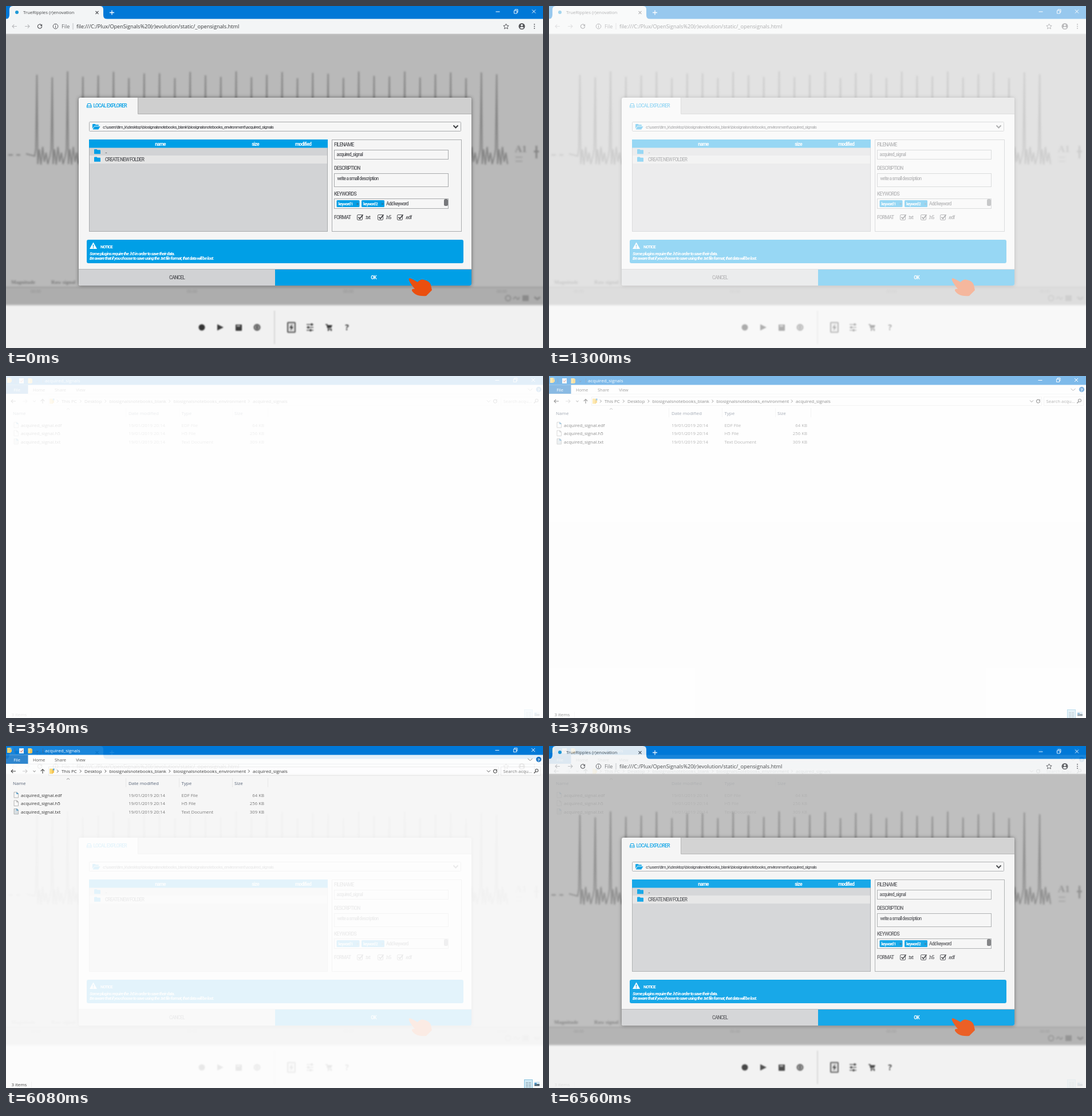
An HTML page that plays this animation: 938 by 597 pixels, repeating every 6620 ms.

```html
<!DOCTYPE html>
<html lang="en">
<head>
<meta charset="utf-8">
<title>Saving an acquired signal</title>
<style>
  html, body { margin: 0; width: 100%; height: 100%; overflow: hidden; background: #fefefe; }
  svg { display: block; width: 938px; height: 597px; }
  text { white-space: pre; }
  .ui { font-family: "Open Sans", "Noto Sans", sans-serif; }
  .app { font-family: Roboto, "Liberation Sans", sans-serif; font-weight: 500; letter-spacing: -.05em; }
  .soft { filter: blur(1.5px); }
  .panel { filter: drop-shadow(0 0 3px #0007); }
</style>
</head>
<body>
<svg viewBox="0 0 938 597">
  <g id="explorer"></g>
  <g id="dialog"></g>
</svg>
<script>
const BLUE = '#009fe6', WIN = '#0078d7', GREY = '#a9abad', INK = '#55565a';
const rect = (x, y, w, h, fill, more = '') =>
  `<rect x="${x}" y="${y}" width="${w}" height="${h}" fill="${fill}" ${more}/>`;
const box = (x, y, w, h, fill, stroke, more = '') =>
  rect(x + .5, y + .5, w - 1, h - 1, fill, `stroke="${stroke}" ${more}`);
const text = (x, y, size, fill, str, more = '') =>
  `<text x="${x}" y="${y}" font-size="${size}" fill="${fill}" ${more}>${str}</text>`;
const line = (d, stroke, w = 1, more = '') =>
  `<path d="${d}" fill="none" stroke="${stroke}" stroke-width="${w}" ${more}/>`;
const shape = (d, fill) => `<path d="${d}" fill="${fill}"/>`;
const circle = (x, y, r, fill, more = '') => `<circle cx="${x}" cy="${y}" r="${r}" fill="${fill}" ${more}/>`;
const at = (x, y, body) => `<g transform="translate(${x} ${y})">${body}</g>`;
const group = (cls, ...parts) => `<g class="${cls}">${parts.join('')}</g>`;

const MID = 'text-anchor="middle"', END = 'text-anchor="end"', BOLD = 'font-weight="700"';

const windowButtons = (x, y) => at(x, y,
  line('M-3.5 .5H3.5', '#fff') +
  line('M28.5-1.5h5v5h-5zM30-1.5v-2h5v5h-1.5', '#fff', .9) +
  line('M60-3l6 6m0-6l-6 6', '#fff'));
const arrow = (x, y, color, dir) =>
  line(`M${x - 4 * dir} ${y}h${8 * dir}m${-3.2 * dir}-3.2l${3.2 * dir} 3.2l${-3.2 * dir} 3.2`, color, 1.1);
const reload = (x, y, r, color) =>
  line(`M${x + r} ${y}a${r} ${r} 0 1 1-${r * .3}-${r * .7}`, color, 1.2) +
  shape(`M${x + r + .5} ${y - r - .5}v${r}h-${r}z`, color);

/* Browser window */
function browser() {
  const dots = [-3.5, 0, 3.5].map(d => circle(923, 35.5 + d, .9, INK)).join('');
  return group('ui',
    rect(0, 0, 938, 23, WIN),
    shape('M0 23Q6 22 6 15V6Q6 0 12 0H164Q170 0 170 6V16Q170 23 177 23Z', '#f3f5f6'),
    rect(0, 22.5, 938, 26, '#f3f5f6'),
    circle(19, 11, 3, '#1f9ad6'),
    text(30, 14, 7.87, '#454749', 'TrueRipples (r)enovation'),
    line('M156.500 9l5 5m0-5l-5 5', INK, 1.1),
    line('M181 11.500h8m-4-4v8', '#fff', 1.3),
    windowButtons(859, 9.500),
    arrow(15, 35.500, '#b8babc', -1), arrow(37, 35.500, '#b8babc', 1),
    reload(59, 35.500, 3.6, INK),
    circle(86.500, 35.500, 4.3, 'none', `stroke="${INK}"`),
    line('M86.500 35v3m0-5.200v1.200', INK, 1.1),
    text(97, 39, 9, '#66686b', 'File'), rect(116.500, 30, 1, 11, '#c0c2c4'),
    text(123, 38.700, 9.14, '#36383a',
      'file:///C:/Plux/OpenSignals%20(r)evolution/static/_opensignals.html'),
    line('M873.500 31l1.400 3 3.300.400-2.500 2.200.700 3.300-2.900-1.700-2.900 1.700.700-3.300-2.500-2.200 3.300-.400z', INK),
    circle(901, 35.500, 5.5, INK), circle(901, 33.500, 1.8, '#f3f5f6'),
    shape('M897.500 38Q901 34.700 904.500 38Q901 41 897.500 38', '#f3f5f6'), dots);
}

/* Blurred recording page behind the dialog */
function recording() {
  let wave = 'M35 258';
  for (let i = 0; i < 31; i++) {
    const x = 54 + i * 26.77, top = 120 + 6 * Math.sin(i * 2.3);
    const pts = [[-4, 262], [-2, 250], [0, top], [1.5, 276], [4, 250], [7, 277], [10, 246], [13, 272], [16, 256], [19, 276]];
    wave += pts.map(([dx, y]) => `L${x + dx} ${y}`).join('');
  }
  const c = '#3c3c3c';
  return rect(0, 48, 938, 476, '#b9b9b9') + group('soft',
    rect(-5, 47, 948, 2, '#d0d0d0'),
    rect(-5, 491, 948, 31, '#adadad'), rect(-5, 490, 948, 1.5, '#999'),
    rect(-5, 522, 948, 80, '#f1f1f1'), rect(-5, 521, 948, 2, '#c8c8c8'),
    line(wave, '#858585', 2.2),
    line('M4 260h8m6 0h7', '#8a8a8a', 2.5),
    text(889, 255, 17, '#888', 'A1', BOLD),
    line('M890 264h12m-12 7h12', '#a0a0a0', 2),
    line('M922 254h9m-4.500-10v22', '#858585', 3),
    text(9, 485, 9, '#777', 'Magnitude', BOLD), text(79, 485, 9, '#777', 'Raw signal', BOLD),
    [52, 325, 598, 866].map(x => text(x, 501, 8, '#929292', '00:00', MID)).join(''),
    circle(877, 510, 4.5, 'none', 'stroke="#8c8c8c" stroke-width="2"'),
    line('M886 512q4-7 6-2t5-2', '#8c8c8c', 2),
    rect(902, 505, 11, 10, '#8a8a8a'), line('M923 508l5 4 5-4', '#888', 3)) +
  `<g style="filter:blur(1px)">` +
    circle(342, 561, 5.5, '#333') + shape('M369 555.500l11 5.500-11 5.500z', '#3c3c3c') +
    rect(401, 556, 11, 11, c, 'rx="1"') + rect(403, 557, 6, 3, '#999') +
    circle(438.500, 561, 5, '#999', 'stroke="#555" stroke-width="2"') + rect(437.500, 558, 2, 6, '#444') +
    rect(468, 532, 2, 58, '#d8d8d8') +
    rect(492, 552.500, 13, 17, '#ddd', 'stroke="#555" stroke-width="2" rx="1"') +
    shape('M500 555l-5 7h3l-1 5 5-7h-3z', c) +
    line('M525 556h12m-12 5h12m-12 5h12', '#555', 1.5) +
    line('M534 554v4m-6 1v4m4 1v4', c, 2.5) +
    line('M558 556h3l2 8h6', c, 1.5) + shape('M560 557h10l-2 5h-7z', c) +
    circle(563, 566, 1.3, c) + circle(568, 566, 1.3, c) +
    text(595.500, 566, 14, c, '?', `${MID} ${BOLD} class="ui"`) + '</g>';
}

const folder = (x, y) => shape(`M${x} ${y}q0-1 1-1h3.500l1.200 1.300h4.300q1 0 1 1v6h-11z`, BLUE);
const check = (x, label) =>
  box(x, 364, 10, 10, '#f4f4f4', INK, 'rx="1.5"') +
  line(`M${x + 2.5} 368.500l2.500 2.700 5.500-7`, '#3d3e42', 1.7) +
  text(x + 14, 372, 8.5, INK, label);
const keyword = (x, label) =>
  rect(x, 339, 40, 12, BLUE, 'rx="1.5"') +
  text(x + 3, 347.500, 7, '#fff', label, BOLD) +
  line(`M${x + 35} 344l3 3m0-3l-3 3`, '#40617a', 1);

function saveDialog() {
  const label = (y, str) => text(573, y, 8.6, INK, str);
  const head = (x, str) => text(x, 243.500, 8.7, '#fff', str, `${MID} ${BOLD}`);
  return group('app',
    rect(127, 160, 686, 328, '#f5f5f5', 'rx="3" class="panel"'),
    shape('M231 160H810q3 0 3 3V188H231z', '#cfcfcf'),
    line('M230.500 160V188.500H813', '#b0b0b0'),
    line('M141.500 174.500l1.500-4h4.500l1.500 4v2.500h-7.500zM141.500 174.500h7.500', BLUE, 1.1),
    text(152.500, 177, 8.5, BLUE, 'LOCAL EXPLORER'),

    box(145, 202, 650, 17, '#f6f6f6', GREY, 'rx="1"'),
    shape('M151 214v-7q0-1 1-1h3.500l1.200 1.300h4.300q1 0 1 1v1h-7.500z', BLUE),
    shape('M151.500 215.500l3-5.200h10l-3.200 5.200z', BLUE),
    text(169, 213.500, 8, INK,
      'c:\\users\\tim_k\\desktop\\biosignalsnotebooks_blank\\biosignalsnotebooks_environment\\acquired_signals'),
    line('M781.500 208.500l4 4 4-4', '#3d3e42', 2),

    box(145, 233, 417, 161, '#d2d3d5', GREY),
    rect(145, 233, 417, 14.500, BLUE),
    rect(146, 261, 415, 14, '#e5e5e5'),
    head(269.500, 'name'), head(435.500, 'size'), head(519, 'modified'),
    folder(154, 251), folder(154, 264.500),
    text(173, 257, 8.25, INK, '..'), text(173, 271, 8.25, INK, 'CREATE NEW FOLDER'),

    box(569, 233, 227, 161, 'none', GREY),
    label(245, 'FILENAME'), label(286, 'DESCRIPTION'), label(331, 'KEYWORDS'), label(372, 'FORMAT'),
    box(573, 251, 200, 17, '#f6f6f6', GREY), text(577.500, 262, 8.2, INK, 'acquired_signal'),
    box(573, 292, 200, 24, '#f6f6f6', GREY), text(578.500, 303.500, 8.4, INK, 'write a small description'),
    box(573, 336, 200, 18, '#f6f6f6', GREY),
    keyword(577.500, 'keyword 1'), keyword(621, 'keyword 2'),
    text(664, 348, 8.2, INK, 'Add keyword'),
    rect(765, 337, 7, 12, '#77787b', 'rx="2.5"'),
    check(613, '.txt'), check(649, '.h5'), check(683, '.edf'),

    rect(141, 408, 658, 41, BLUE, 'rx="3"'),
    shape('M152.500 412.500l6.500 11.500h-13z', '#fff'),
    line('M152.500 416.500v3.700m0 1v1.500', BLUE, 1.5),
    text(165, 422.500, 7.4, '#fff', 'NOTICE', BOLD),
    text(146, 434.500, 8, '#fff', 'Some plugins require the .h5 in order to save their data.', `${BOLD} font-style="italic"`),
    text(146, 443, 8, '#fff', 'Be aware that if you choose to save using the .txt file format, that data will be lost.',
      `${BOLD} font-style="italic"`),

    shape('M127 460H470V488H130q-3 0-3-3z', '#d1d2d4'),
    shape('M470 460H813V485q0 3-3 3H470z', BLUE),
    line('M127 459.500H813', '#b4b5b7'),
    text(298.500, 476.700, 8.4, INK, 'CANCEL', MID),
    text(642, 476.700, 8.4, '#fff', 'OK', `${MID} ${BOLD}`),
    shape('M705 475Q711 477 719 482Q724 476 730 478Q740 480 742 487L744 496L734 506Q722 507 715 503Q708 498 709 495Q711 493 714 494Q706 484 704 479Q703 476 705 475Z', '#ea4f0f'));
}

/* File manager window */
const page = (x, y, fold = '#9a9a9a', fill = '#fff') =>
  shape(`M${x} ${y}h5l2.500 2.500v7h-7.500z`, fill) +
  line(`M${x} ${y}h5l2.500 2.500v7h-7.500z`, '#a5a5a5', .8) + line(`M${x + 5} ${y}v2.500h2.500`, fold, 1.4);
const openFolder = (x, y) =>
  rect(x, y, 6, 9, '#ffd868') + shape(`M${x + 4} ${y + 2}l4-2v7l-4 2z`, '#f3bf45') +
  rect(x + 6, y, 2.500, 3, '#3f9be0');

function explorer() {
  const chevron = x => line(`M${x} 41.500l2.500 2.500-2.500 2.500`, '#444');
  const crumbs = [[97, 'This PC'], [137, 'Desktop'], [180.500, 'biosignalsnotebooks_blank'],
    [292.500, 'biosignalsnotebooks_environment'], [431, 'acquired_signals']];
  const files = [['edf', 'EDF File', '64 KB'], ['h5', 'H5 File', '256 KB'], ['txt', 'Text Document', '309 KB']];
  const columns = [[12, 'Name'], [214, 'Date modified'], [306.500, 'Type'], [399, 'Size']];
  return group('ui',
    rect(0, 0, 938, 597, '#fefefe'),
    rect(0, 0, 938, 15.500, WIN),
    openFolder(2, 3), rect(15, 4, 1, 8, '#2a5f94'),
    rect(23, 4, 8, 9, '#f5f5f5'), line('M25 8.500l1.700 2 3-4', '#d04a3c', 1),
    rect(38.500, 4, 6, 9, '#ffd868'), shape('M42 6l4-1v7l-4 1z', '#f3bf45'),
    line('M53 8.500l1.700 1.500 1.700-1.500', '#22496e'), rect(64, 4, 1, 8, '#2a5f94'),
    text(68, 11, 8, '#fff', 'acquired_signals'),
    windowButtons(858, 7),

    rect(0, 15.500, 38.500, 15.500, '#1979ca'),
    text(19, 26.500, 7.4, '#fff', 'File', MID),
    [[57.500, 'Home'], [95, 'Share'], [130.500, 'View']].map(([x, s]) => text(x, 26.700, 7.5, '#444', s, MID)).join(''),
    line('M911.500 22l4 3.500 4-3.500', '#777'),
    circle(930.500, 23.500, 4.7, '#1170c4'), text(930.500, 26.500, 7.5, '#fff', '?', `${MID} ${BOLD}`),
    rect(0, 31, 938, 1, '#f0f1f2'),

    arrow(13, 44, '#333', -1), arrow(33, 44, '#c8c8c8', 1),
    line('M47.500 43.200l2 1.800 2-1.800', '#555'),
    line('M64 48v-7.500m-3.300 3.300l3.300-3.300 3.300 3.300', '#444', 1.2),
    box(74, 36, 787, 16, '#fff', '#ececec'), box(864, 36, 70, 16, '#fff', '#ececec'),
    openFolder(76, 39.500),
    crumbs.map(([x, s]) => chevron(x - 8) + text(x, 47, 7.9, '#222', s)).join(''),
    line('M840 42.500l3 3 3-3', '#444'), reload(854.500, 44, 3, '#444'),
    text(868.500, 47, 7.8, '#6c6c6c', 'Search acqu...'),
    circle(927, 42.800, 2.5, 'none', 'stroke="#444" stroke-width="1.1"'), line('M925 44.800l-2.700 2.800', '#444', 1.4),

    line('M106 58.500l2.500-2 2.500 2', '#777', .9),
    columns.map(([x, s]) => text(x, 68, 8, '#4c5a70', s)).join(''),
    [209, 302, 395, 457].map(x => rect(x, 56, 1, 16, '#ededed')).join(''),
    files.map(([ext, kind, size], i) => {
      const y = 88.700 + i * 14.4;
      return page(14, y - 8, ext === 'h5' ? '#aaa' : '#3b8fc4', ext === 'txt' ? '#dce4e8' : '#fff') +
        text(26, y, 7.95, '#222', 'acquired_signal.' + ext) +
        text(214, y, 7.9, '#727272', '19/01/2019 20:14') +
        text(306.500, y, 7.9, '#727272', kind) + text(451, y, 7.8, '#727272', size, END);
    }).join(''),

    text(9.500, 594, 7.9, '#333', '3 items'), rect(44, 586, 1, 10, '#f2f2f2'),
    box(905, 582, 15, 16, '#cce8f5', '#7fbfdf'),
    line('M908 587.500h4m1 0h4m-9 2.500h4m1 0h4m-9 2.500h4m1 0h4m-9 2.500h4m1 0h4', '#829aa8'),
    rect(923, 586, 9, 7, '#cfe5f3'), rect(923, 590, 9, 3.500, '#3d5363'), rect(923, 588, 4, 3, '#3f86b8'));
}

const back = document.getElementById('explorer');
const front = document.getElementById('dialog');
back.innerHTML = explorer();
front.innerHTML = recording() + browser() + saveDialog();

const LOOP = 6620, STEP = 60;
const start = performance.now();

function draw(now) {
  const t = Math.max(0, now - start) % LOOP;
  // Fades move in tenths, the first one landing at the start time.
  const fade = from => Math.min(1, Math.max(0, (Math.floor((t - from) / STEP) + 1) / 10));
  back.setAttribute('opacity', fade(3540));
  front.setAttribute('opacity', t < 6000 ? 1 - fade(1000) : fade(6080));
  requestAnimationFrame(draw);
}
draw(start);
</script>
</body>
</html>
```
